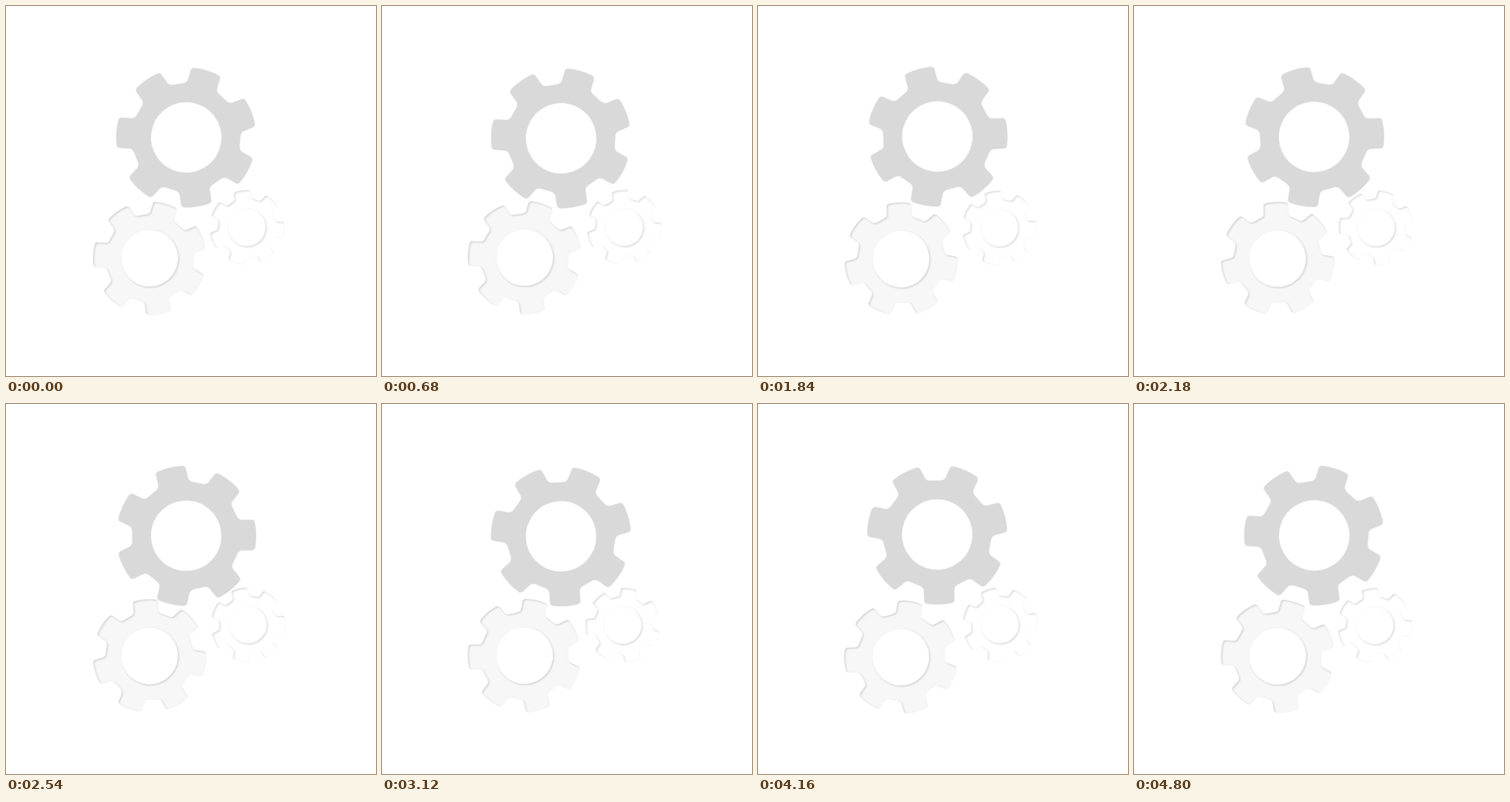
An HTML page for the animation above (4.82 s loop, 500 px wide and 500 px high).

```html
<!DOCTYPE html>
<html lang="en">
<head>
<meta charset="utf-8">
<title>Turning gears</title>
<style>
  html, body { margin: 0; width: 100%; height: 100%; overflow: hidden; background: #fff; }
  svg { display: block; width: 100%; height: 100%; }

  /* whole turns end 20 ms before the loop does */
  .spin { animation: spin 4820ms linear infinite; }
  @keyframes spin {
    0% { transform: rotate(0deg); }
    99.585%, 100% { transform: rotate(var(--turn)); }
  }
  .big { --turn: 720deg; color: #d9d9d9; }
  .medium { --turn: -720deg; color: #f7f7f7; }
  .small { --turn: -1080deg; color: #fff; }
</style>
</head>
<body>
<svg viewBox="0 0 500 500">
  <defs>
    <path id="tooth" d="M-26-56L-28.5-67.2Q-21.2-70.1-20.7-75L-20.7-88.5Q-20.7-92.3-16.5-93.3A94.7 94.7 0 0 1 16.5-93.3Q20.7-92.3 20.7-88.5L20.7-75Q21.2-70.1 28.5-67.2L26-56Z"/>
    <g id="gear" fill="currentColor">
      <circle r="60.25" fill="none" stroke="currentColor" stroke-width="25.5"/>
      <use href="#tooth"/>
      <use href="#tooth" transform="rotate(51.4286)"/>
      <use href="#tooth" transform="rotate(102.8571)"/>
      <use href="#tooth" transform="rotate(154.2857)"/>
      <use href="#tooth" transform="rotate(205.7143)"/>
      <use href="#tooth" transform="rotate(257.1429)"/>
      <use href="#tooth" transform="rotate(308.5714)"/>
    </g>
    <!-- inner shadow along the upper left edges -->
    <filter id="bevel" filterUnits="userSpaceOnUse" x="-100" y="-100" width="200" height="200" color-interpolation-filters="sRGB">
      <feGaussianBlur in="SourceAlpha" stdDeviation="1.1"/>
      <feOffset dx="1.1" dy="1.2" result="inside"/>
      <feFlood flood-color="#000" flood-opacity=".19"/>
      <feComposite in2="inside" operator="out"/>
      <feComposite in2="SourceAlpha" operator="in" result="shade"/>
      <feMerge>
        <feMergeNode in="SourceGraphic"/>
        <feMergeNode in="shade"/>
      </feMerge>
    </filter>
  </defs>

  <!-- each gear sits slightly off its axle, so it wobbles as it turns -->
  <g class="big" transform="translate(242.3 177.6)">
    <g class="spin">
      <use href="#gear" transform="translate(1.25 0) rotate(16.8)"/>
    </g>
  </g>
  <g class="medium" transform="translate(193.1 341)" filter="url(#bevel)">
    <g class="spin">
      <use href="#gear" transform="translate(1.1 -.2) rotate(16.6) scale(.808)"/>
    </g>
  </g>
  <g class="small" transform="translate(326.5 298.9)" filter="url(#bevel)">
    <g class="spin">
      <use href="#gear" transform="translate(-.9 .3) rotate(-8) scale(.533)"/>
    </g>
  </g>
</svg>
</body>
</html>
```
